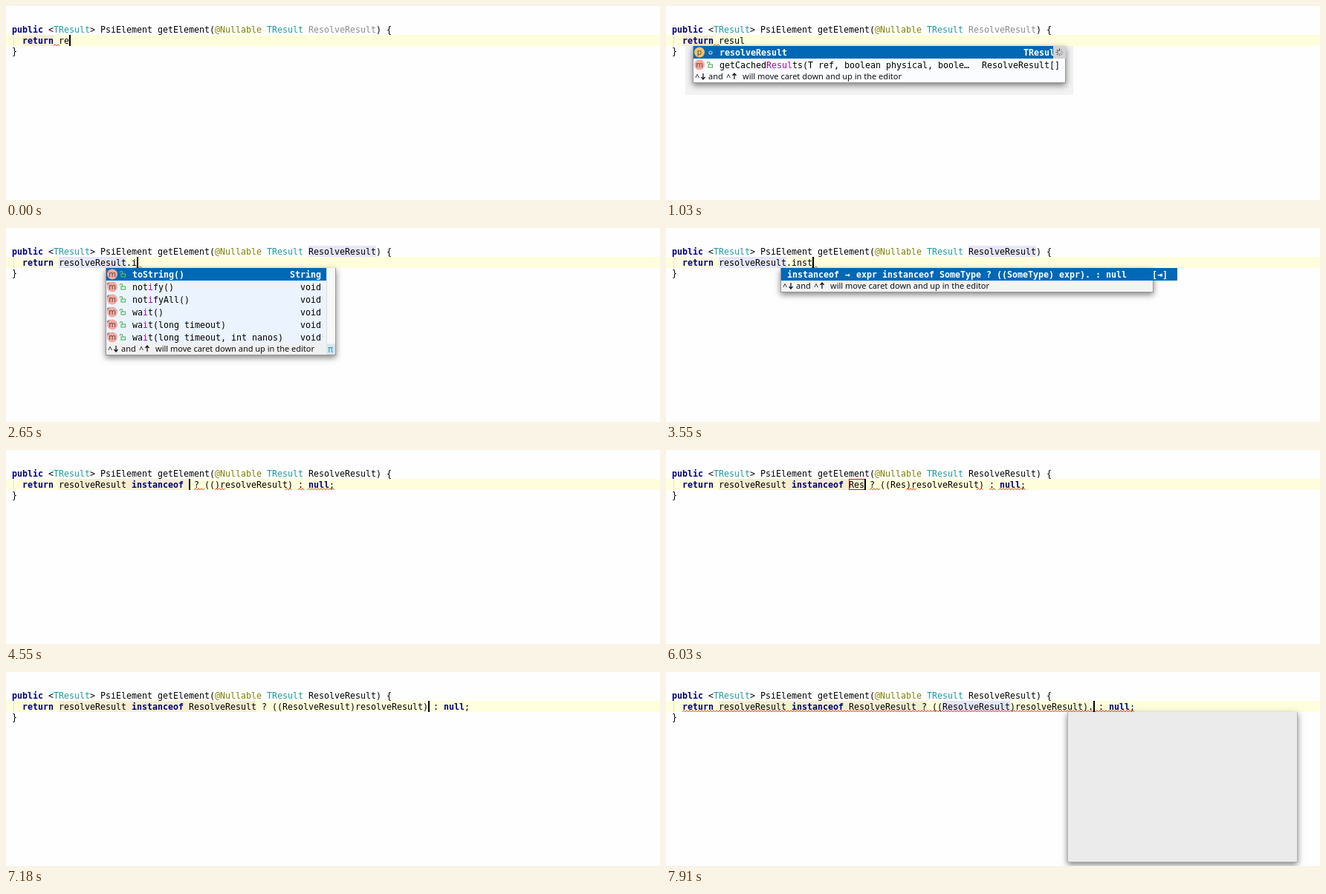
Animation, 880 px wide and 262 px high, one loop 8000 ms. Source, as an HTML page with a canvas:

```html
<!DOCTYPE html>
<html lang="en">
<head>
<meta charset="utf-8">
<title>Code completion</title>
<style>
  html, body { margin: 0; width: 100%; height: 100%; overflow: hidden; background: #fefefe; }
  canvas { display: block; }
</style>
</head>
<body>
<canvas id="stage" width="880" height="262"></canvas>
<script>
const g = document.getElementById('stage').getContext('2d');
const LOOP = 8000, CHAR = 7, LEFT = 22;
const MONO = '11.63px "DejaVu Sans Mono", monospace';
const SANS = '11px "Noto Sans", sans-serif';
const NAVY = '#000080', TEAL = '#20999d', OLIVE = '#808000', GRAY = '#8c8c8c';
const BLUE = '#0068b5', PURPLE = '#b000c0', TAN = '#f6eed2', LILAC = '#e6e6fa';
const PINK = '#f5aaa2', PALE = '#ebf4fe', PLAIN = '#fbfcff';
const col = c => LEFT + c * CHAR;

function rect(x, y, w, h, color) {
  g.fillStyle = color;
  g.fillRect(x, y, w, h);
}

// Draws text and returns the x where it ends on the character grid.
function text(s, x, y, color = '#000', bold = false, font = MONO) {
  g.font = (bold ? 'bold ' : '') + font;
  g.fillStyle = color;
  g.fillText(s, x, y);
  return x + s.length * CHAR;
}

function wave(from, to) {
  g.strokeStyle = '#f03020';
  g.lineWidth = 1;
  g.beginPath();
  for (let x = from, i = 0; x <= to; x += 2, i++) g.lineTo(x, i % 2 ? 51.8 : 53.8);
  g.stroke();
}

function panel(x, y, w, h, color, border = '#999') {
  g.save();
  g.shadowColor = 'rgba(0,0,0,.5)';
  g.shadowBlur = 8;
  g.shadowOffsetY = 3;
  rect(x, y, w, h, border);
  g.restore();
  rect(x + 1, y, w - 2, h - 1, color);
}

function lock(x, y) {
  g.strokeStyle = '#5fb865';
  g.lineWidth = 1.2;
  g.strokeRect(x + 2, y + 8, 5.5, 4);
  g.beginPath();
  g.arc(x + 2, y + 6.5, 1.8, Math.PI, 0);
  g.lineTo(x + 3.8, y + 8);
  g.stroke();
}

function badge(x, y, letter, color, pin) {
  g.fillStyle = color;
  g.beginPath();
  g.arc(x, y, 7, 0, 7);
  g.fill();
  g.textAlign = 'center';
  text(letter, x, y + 3.5, '#5a4640', false, '10px "DejaVu Sans", sans-serif');
  g.textAlign = 'left';
  if (pin) {
    g.fillStyle = '#777';
    g.beginPath();
    g.moveTo(x - 7, y - 2);
    g.lineTo(x - 7, y - 5);
    g.lineTo(x - 3, y - 7);
    g.fill();
  }
}

function spinner(x, y, t) {
  rect(x, y, 17, 17, '#d2d2d2');
  const turn = Math.floor(t / 146);
  g.lineWidth = 1.2;
  for (let i = 0; i < 8; i++) {
    const a = i * Math.PI / 4, c = Math.cos(a), s = Math.sin(a);
    g.strokeStyle = `rgba(60,60,60,${0.25 + ((i - turn + 800) % 8) / 10})`;
    g.beginPath();
    g.moveTo(x + 8.5 + c * 2, y + 8.5 + s * 2);
    g.lineTo(x + 8.5 + c * 5, y + 8.5 + s * 5);
    g.stroke();
  }
}

function hint(x, y) {
  const put = (s, dx) => text(s, x + dx, y, '#111', false, SANS);
  const arrow = (dx, up) => {
    text('^', x + dx, y + 1, '#111', false, SANS);
    const tip = up ? y - 8 : y, back = up ? 3 : -3, mid = x + dx + 11;
    g.strokeStyle = '#111';
    g.lineWidth = 1.2;
    g.beginPath();
    g.moveTo(mid, y - 8);
    g.lineTo(mid, y);
    g.moveTo(mid - 2.5, tip + back);
    g.lineTo(mid, tip);
    g.lineTo(mid + 2.5, tip + back);
    g.stroke();
  };
  arrow(2, false);
  put('and', 20);
  arrow(44, true);
  put('will move caret down and up in the editor', 66);
}

// Braces in a label mark the matched letters.
function item(row, x, y, right, selected) {
  const ink = selected ? '#fff' : '#000';
  badge(x + 9, y + 8.5, row.icon, row.color, row.pin);
  if (row.icon === 'p') {
    g.strokeStyle = '#bcd';
    g.lineWidth = 1.2;
    g.beginPath();
    g.arc(x + 24, y + 9, 2, 0, 7);
    g.stroke();
  } else lock(x + 19, y);
  let end = x + 36;
  row.label.split(/[{}]/).forEach((part, i) => {
    end = text(part, end, y + 13, i % 2 && !selected ? PURPLE : ink, selected);
  });
  if (row.pack) text(row.pack, end + CHAR, y + 13, selected ? '#fff' : '#aaa', selected);
  if (row.type) text(row.type, right - row.type.length * CHAR, y + 13, ink, selected);
}

function list(x, w, rows, { bg = PLAIN, help = true, spin = false, bar = false }, t) {
  const bottom = 54 + rows.length * 17, inner = bar ? w - 13 : w - 1;
  panel(x, 54, w, rows.length * 17 + 16, bg);
  rect(x + 1, 54, inner - 1, 17, BLUE);
  rows.forEach((row, i) => item(row, x, 54 + i * 17, x + (bar ? inner - 7 : w - 8), !i));
  if (spin) spinner(x + w - 17, 54, t);
  if (bar) {
    rect(x + inner, 54, 12, bottom - 54, '#f8f8f8');
    rect(x + inner, 54, 1, bottom - 54, '#ddd');
    rect(x + 1, bottom, w - 2, 15, '#f0f0f0');
    rect(x + inner, bottom + 1, 12, 14, '#d8e6ee');
    text('π', x + inner + 2, bottom + 12, '#2a9cc4', false, '12px "DejaVu Sans", sans-serif');
  }
  if (help) hint(x + 1, bottom + 11);
}

const method = (label, type) => ({ icon: 'm', color: PINK, pin: true, label, type });
const variables = [
  { icon: 'p', color: '#f0c070', label: 'resolveResult', type: 'TResult' },
  { icon: 'm', color: PINK, label: 'getCached{Resul}ts(T ref, boolean physical, boole…', type: 'ResolveResult[]' }
];
const asText = method('toString()', 'String');
const matching = ['not{i}fy()', 'not{i}fyAll()', 'wa{i}t()', 'wa{i}t(long timeout)',
  'wa{i}t(long timeout, int nanos)'].map(s => method(s, 'void'));
const members = [asText, method('equals(Object obj)', 'boolean'), method('hashCode()', 'int'),
  method('getClass()', 'Class<?>'), ...matching.map(m => method(m.label.replace(/[{}]/g, ''), 'void'))];
const classes = [
  { icon: 'I', color: '#a9dba0', label: 'ResolveResult', pack: '(com.intellij.psi)' },
  { icon: 'C', color: '#a4d8ea', label: 'PsiElement{Res}olve{R}esult', pack: '(com.intellij.psi)' }
];

const blank = (x, w, h) => () => panel(x, 54, w, h, '#ebebeb', '#b4b4b4');
const memberList = rows => t => list(134, 310, rows, { bg: PALE, bar: true }, t);
const classList = t => list(211, 502, classes, { help: false, spin: true }, t);

function variableList(t) {
  rect(26, 54, 522, 66, '#f2f2f2');
  list(36, 502, variables, { spin: true }, t);
}

function template() {
  panel(154, 54, 502, 33, '#f4f4f4');
  rect(155, 54, 533, 17, BLUE);
  text('instanceof', 163, 67, '#fff', true);
  text('→', 241, 67, '#fff', true);
  text('expr instanceof SomeType ? ((SomeType) expr). : null', 256, 67, '#fff', true);
  text('[⇥]', 654, 67, '#fff', true);
  hint(155, 82);
}

// Typing the first word, with the keyword lit.
const start = (word, more) => ({
  src: 'return ' + word, caret: 7 + word.length, marks: [[0, 6, TAN]], waves: [[6, 7.3]], ...more
});

// Typing after the variable, with its uses lit.
const after = (tail, more) => ({
  src: 'return resolveResult' + tail, caret: 20 + tail.length, used: true, lit: true,
  marks: [[7, 20, LILAC]], waves: tail ? [[20 + tail.length - .2, 21 + tail.length]] : [], ...more
});

// The expanded conditional, with the type name being filled in.
function cond(type, more = {}) {
  const n = type.length, p = 35 + 2 * n;
  return {
    src: `return resolveResult instanceof ${type} ? ((${type})resolveResult) : null;`,
    caret: 32 + n, used: true, field: n, marks: [[7, 32 + n, TAN]],
    waves: [[33 + n, 35 + n], ...(more.popup ? [] : [[p + 2, p + 4]]),
      [p + 15.6, p + 17], [p + 18, p + 19.3], [p + 19.8, p + 25]],
    ...more
  };
}

const full = 'ResolveResult';
const done = { field: -1, caret: 78, waves: [] };
const cast = [50, 63, LILAC];
const steps = [
  [0, start('re')],
  [300, start('resu')],
  [450, start('resul')],
  [750, start('resul', { popup: variableList, caret: -1 })],
  [1180, start('resul', { popup: variableList })],
  [1620, start(full, { waves: [], used: true })],
  [1770, after('', { marks: [[0, 6, TAN], [7, 20, LILAC]] })],
  [1920, after('')],
  [2210, after('.', { popup: blank(134, 310, 169) })],
  [2360, after('.', { popup: memberList(members) })],
  [2650, after('.i', { popup: memberList([asText, ...matching]) })],
  [2950, after('.in', { popup: memberList([asText]) })],
  [3100, after('.ins')],
  [3400, after('.inst')],
  [3550, after('.inst', { popup: template })],
  [3990, cond('', { waves: [], lit: true })],
  [4130, cond('')],
  [5440, cond('R')],
  [5590, cond('Re')],
  [5890, cond('Res')],
  [6180, cond('Res', { popup: blank(211, 502, 204) })],
  [6320, cond('ResR', { popup: classList })],
  [6910, cond(full, { waves: [] })],
  [7180, cond(full, done)],
  [7470, cond(full, { ...done, marks: [[7, 45, TAN], cast] })],
  [7910, cond(full, {
    ...done, src: `return resolveResult instanceof ${full} ? ((${full})resolveResult). : null;`,
    caret: 79, marks: [[7, 47, TAN], cast], waves: [[0, 87]], popup: blank(540, 310, 203)
  })]
];

function header(s) {
  if (s.lit) rect(407, 24, 91, 15, LILAC);
  let x = 8;
  for (const [part, color, bold] of [['public', NAVY, true], [' <'], ['TResult', TEAL],
    ['> PsiElement getElement('], ['@Nullable', OLIVE], [' TResult ', TEAL],
    [full, s.used ? '#000' : GRAY], [') {']]) x = text(part, x, 36, color, bold);
}

function draw(now) {
  const t = now % LOOP;
  const s = steps.findLast(step => step[0] <= t)[1];
  rect(0, 0, 880, 262, '#fefefe');
  rect(0, 39, 880, 15, '#fffedc');
  rect(10, 39, 1, 15, '#e4e4d4');
  header(s);
  for (const [a, b, color] of s.marks) rect(col(a), 39, (b - a) * CHAR, 15, color);
  let x = LEFT;
  s.src.split(/\b(return|instanceof|null)\b/).forEach((part, i) => {
    x = text(part, x, 51, i % 2 ? NAVY : '#000', i % 2 === 1);
  });
  text('}', 8, 65);
  for (const [a, b] of s.waves) wave(col(a), col(b));
  if (s.field >= 0) {
    g.strokeStyle = '#e01010';
    g.lineWidth = 1;
    g.strokeRect(col(32) + .5, 39.5, s.field * CHAR + 1, 14);
  }
  if (s.caret >= 0) rect(col(s.caret), 39, 2, 15, '#000');
  if (s.popup) s.popup(t);
}

const begin = performance.now();
(function tick() {
  draw(performance.now() - begin);
  requestAnimationFrame(tick);
})();
</script>
</body>
</html>
```
